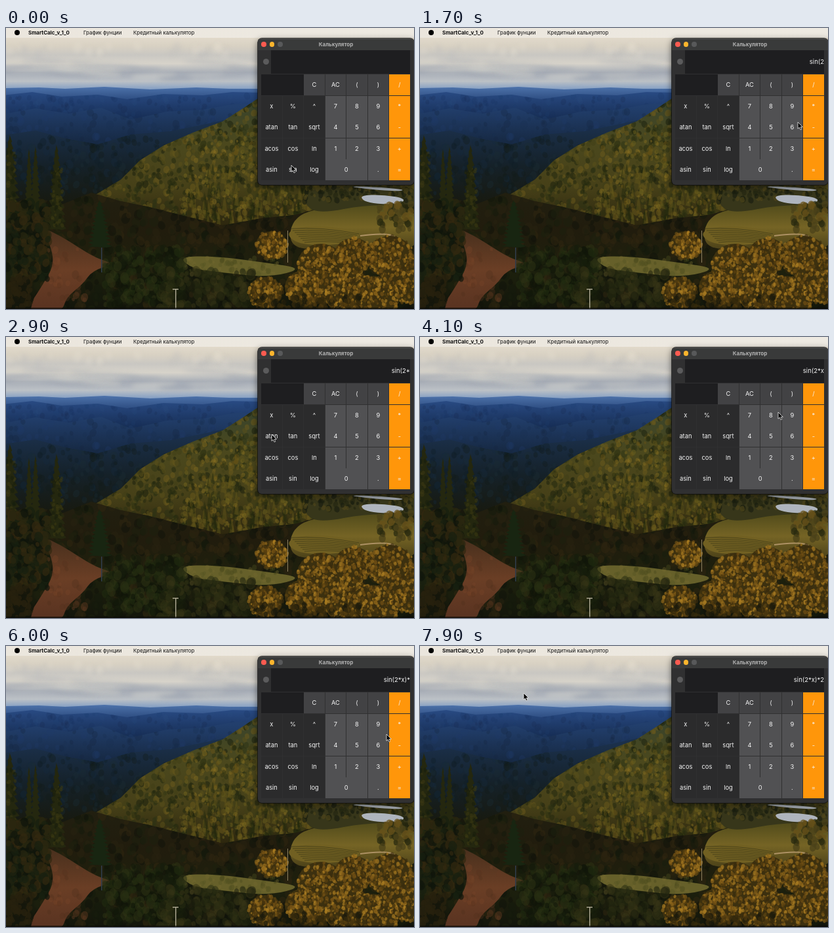
An HTML page with a canvas that plays this animation: 622x430 px, repeating every 8 s.

```html
<!DOCTYPE html>
<html lang="ru">
<head>
<meta charset="utf-8">
<title>Калькулятор</title>
<style>
html, body { margin: 0; width: 622px; height: 430px; overflow: hidden; background: #17170f; }
body { position: relative; font-family: Inter, "Noto Sans", sans-serif; cursor: default; }
body > * { position: absolute; }
#land { left: 0; top: 0; }
#menu { left: 0; top: 0; width: 622px; height: 15px; background: linear-gradient(90deg, #ebe6dd, #eeeae2); color: #111; font-size: 7.9px; line-height: 15px; }
#menu > * { position: absolute; top: 0; white-space: pre; }
#menu i { left: 13px; top: 3px; width: 8px; height: 8px; border-radius: 50%; background: #000; }
#win { left: 384px; top: 16px; width: 238px; height: 224px; background: #303031; border-radius: 6px; box-shadow: 0 0 0 .7px #111, 0 3px 11px rgba(0,0,0,.6); color: #f4f4f4; overflow: visible; }
#win > * { position: absolute; box-sizing: border-box; }
#bar { left: 0; top: 0; width: 238px; height: 18px; border-radius: 6px 6px 0 0; background: #393a3a; border-top: 1px solid #565656; color: #b2b2b2; font: 700 8px/16px Inter, "Noto Sans", sans-serif; text-align: center; }
.dot { border-radius: 50%; }
#out { left: 20px; top: 18px; width: 212px; height: 36px; background: #1e1e20; font-size: 9.5px; line-height: 35px; text-align: right; white-space: pre; }
.key { font-size: 9.3px; text-align: center; line-height: 32px; height: 32px; }
#ptr { left: 0; top: 0; overflow: visible; }
</style>
</head>
<body>
<canvas id="land" width="622" height="430"></canvas>
<div id="menu">
  <i></i>
  <b style="left:34px">SmartCalc_v_1_0</b>
  <span style="left:118px">График фунции</span>
  <span style="left:194px">Кредитный калькулятор</span>
</div>
<div id="win">
  <div id="bar">Калькулятор</div>
  <div id="out"></div>
</div>
<svg id="ptr" width="10" height="14"><path d="M0 0V10.2L2.3 8.1L4 11.7L5.8 10.9L4.2 7.4H7.4Z" fill="#050505" stroke="#eee" stroke-width=".8" stroke-linejoin="round"/></svg>
<script>
const g = document.getElementById('land').getContext('2d');
let seed = 41;
const rnd = () => (seed = (seed * 16807) % 2147483647) / 2147483647;
const between = (a, b) => a + (b - a) * rnd();

function shade(y0, y1, ...colors) {
  const f = g.createLinearGradient(0, y0, 0, y1);
  colors.forEach((c, i) => f.addColorStop(i / (colors.length - 1), c));
  return f;
}

// Smooth closed outline through "x,y x,y ..."
function shape(text, fill) {
  const p = text.split(' ').map(s => s.split(',').map(Number));
  const mid = (a, b) => [(a[0] + b[0]) / 2, (a[1] + b[1]) / 2];
  const path = new Path2D();
  path.moveTo(...mid(p[p.length - 1], p[0]));
  p.forEach((a, i) => path.quadraticCurveTo(...a, ...mid(a, p[(i + 1) % p.length])));
  path.closePath();
  g.fillStyle = fill;
  g.fill(path);
  return path;
}

// A slope whose crest follows the given points
function ridge(text, fill) {
  const path = new Path2D('M-5,440 L' + text.split(' ').join(' L') + ' L630,440Z');
  g.fillStyle = fill;
  g.fill(path);
  return path;
}

// Soft dabs of foliage kept inside a path
function leaves(path, [x, y, w, h], n, size, colors, alpha = .55) {
  g.save();
  if (path) g.clip(path);
  g.globalAlpha = alpha;
  for (let i = 0; i < n; i++) {
    const r = between(.4, 1) * size;
    g.fillStyle = colors[rnd() * colors.length | 0];
    g.beginPath();
    g.ellipse(x + rnd() * w, y + rnd() * h, r * .8, r, between(-.5, .5), 0, 7);
    g.fill();
  }
  g.restore();
}

function pine(x, top, base, half, color) {
  g.fillStyle = color;
  g.beginPath();
  g.moveTo(x, top);
  for (let s = 1; s > -2; s -= 2) {
    for (let i = 0; i <= 12; i++) {
      const k = s > 0 ? i / 12 : 1 - i / 12;
      const y = top + (base - top) * k, w = half * Math.pow(k, .7);
      g.lineTo(x + s * w, y);
      g.lineTo(x + s * w * .55, y + s * 2);
    }
  }
  g.fill();
}

function drawLand() {
  g.fillStyle = shade(14, 95, '#e2dacb', '#d8d1c3', '#c9c7c2', '#d7d3ca', '#a7adb6', '#bcc1c6', '#7e9bc3');
  g.fillRect(0, 0, 622, 100);
  g.filter = 'blur(3px)';
  leaves(null, [0, 28, 400, 12], 26, 9, ['#b9babb', '#e8e1d4'], .28);
  for (let i = 0; i < 24; i++) {
    g.globalAlpha = .35;
    g.fillStyle = i % 3 ? '#969fac' : '#e3ded3';
    g.beginPath();
    g.ellipse(rnd() * 400, between(48, 78), between(25, 60), between(1.5, 4), between(-.06, .06), 0, 7);
    g.fill();
  }
  g.globalAlpha = 1;
  g.filter = 'none';

  const blues = ['#1d3c70', '#17305b', '#2a4a7c', '#142747'];
  ridge('-5,92 50,91 90,93 150,90 220,94 290,91 340,93 630,93', shade(90, 150, '#4d72aa', '#1d3a6c', '#172c50'));
  let p = ridge('-5,103 40,98 85,105 140,102 185,109 240,101 300,103 345,98 630,104', shade(97, 180, '#294b84', '#172e55', '#101f36'));
  leaves(p, [0, 103, 400, 55], 200, 6, blues, .2);
  p = ridge('-5,132 45,123 95,131 145,122 190,140 245,128 300,125 350,116 630,112', shade(120, 225, '#223f6d', '#172a45', '#111b22'));
  leaves(p, [0, 128, 390, 60], 180, 7, ['#1f3b68', '#14253f', '#1a3152'], .3);
  p = ridge('-5,164 45,157 95,170 140,178 190,163 250,158 310,146 390,128 630,120', shade(150, 270, '#1b304b', '#152129', '#17190f'));
  leaves(p, [0, 165, 260, 90], 260, 7, ['#15283c', '#111d26', '#1a2b36', '#131b17'], .35);

  // Sunlit slope
  p = ridge('-5,290 125,262 175,232 205,202 240,180 285,160 330,143 363,122 385,107 630,100', shade(110, 310, '#38432c', '#4b481d', '#464018', '#29230d'));
  leaves(p, [145, 108, 480, 190], 1500, 6, ['#23290f', '#2c3215', '#5a501b', '#6c5b1d', '#413f17', '#191e0d'], .5);
  leaves(p, [270, 155, 180, 140], 330, 4.5, ['#806b20', '#6d601e', '#2a2e10', '#665217'], .5);
  for (let i = 0; i < 120; i++) {
    const x = between(275, 480), y = between(205, 290), h = between(9, 23);
    g.globalAlpha = .5;
    pine(x, y, y + h, h * .22, i % 3 ? '#5f541a' : '#242a0e');
  }
  g.globalAlpha = 1;

  // Dark forest floor
  p = ridge('-5,274 40,258 85,270 130,252 175,265 215,273 270,287 330,302 390,291 440,286 500,270 630,258', shade(250, 430, '#211f10', '#211c0d', '#1d200d', '#13150b'));
  leaves(p, [0, 255, 622, 180], 950, 9, ['#141a0d', '#292210', '#1c210e', '#302611', '#10130a'], .5);

  // Meadow, ponds and track
  shape('438,286 500,272 565,268 630,278 630,340 560,344 480,340 430,335', shade(270, 340, '#514b1b', '#756425', '#4a4018'));
  shape('425,315 450,303 500,304 545,314 522,331 450,333', '#716022');
  g.strokeStyle = '#413c17';
  g.lineWidth = .8;
  for (let i = 0; i < 8; i++) {
    g.beginPath();
    g.moveTo(434 + i * 3, 307 + i * 3);
    g.quadraticCurveTo(480, 304 + i * 3, 538 - i * 2, 315 + i * 2);
    g.stroke();
  }
  shape('455,243 630,240 630,273 550,270 480,284 455,272', '#37361a');
  leaves(null, [455, 241, 167, 25], 110, 5, ['#232711', '#4f451a', '#191d0f'], .65);
  shape('540,256 575,255 610,261 600,270 565,269 545,265', '#aeb4bd');
  shape('520,242 560,243 608,247 600,250 555,247', '#aab0b8');
  g.strokeStyle = '#ad9164';
  g.lineWidth = 2;
  g.beginPath();
  g.moveTo(540, 318);
  g.bezierCurveTo(600, 309, 610, 326, 566, 332);
  g.stroke();
  leaves(null, [565, 270, 60, 40], 60, 7, ['#4b4219', '#28290f', '#655019'], .75);
  shape('262,350 320,349 395,359 455,368 400,382 330,374 285,369', '#66602a');
  leaves(null, [270, 352, 150, 25], 70, 5, ['#545322', '#756a31', '#454519'], .35);

  // Dirt road
  shape('55,305 83,318 108,334 137,352 166,361 132,371 117,392 92,412 85,436 28,436 58,390 74,360 66,328', shade(310, 430, '#49301d', '#6a3e25', '#593321'));
  leaves(null, [62, 338, 60, 80], 40, 7, ['#774629', '#51301e', '#643a23'], .35);
  leaves(null, [150, 335, 120, 90], 240, 9, ['#202c10', '#161e0c', '#2b3214', '#111609'], .55);
  leaves(null, [235, 372, 150, 58], 180, 9, ['#282b11', '#181b0c', '#353315'], .5);

  // Trees on the left
  for (const [x, top, base, w] of [[6, 163, 292, 18], [35, 184, 288, 8], [45, 181, 283, 9], [77, 178, 307, 15], [143, 263, 334, 19]])
    pine(x, top, base, w, x === 143 ? '#182511' : '#24270f');
  leaves(null, [0, 185, 14, 90], 45, 4, ['#3d3914', '#171f0e'], .55);
  leaves(null, [69, 215, 17, 88], 50, 3.5, ['#3a3813', '#171d0c'], .55);
  leaves(null, [0, 267, 64, 117], 260, 9, ['#172010', '#28260f', '#32280f', '#10160b'], .7);
  leaves(null, [0, 382, 38, 48], 60, 8, ['#15160b', '#27200e'], .8);

  // Golden crowns, lower right
  const gold = ['#765316', '#59400f', '#936a1c', '#3a2d0e', '#ad8023'];
  for (const [x, y, r] of [[405, 332, 24], [480, 362, 36], [455, 397, 30], [395, 404, 26], [515, 397, 38], [530, 348, 30], [585, 350, 36], [612, 387, 38], [560, 413, 38]]) {
    g.fillStyle = '#3c300f';
    g.beginPath();
    g.ellipse(x, y, r, r * .88, 0, 0, 7);
    g.fill();
    for (let i = 0; i < r * 7; i++) {
      const a = rnd() * 6.28, d = Math.sqrt(rnd()) * r;
      leaves(null, [x + Math.cos(a) * d, y + Math.sin(a) * d * .9, 1, 1], 1, 3.8, gold, .65);
    }
  }
  leaves(null, [380, 410, 160, 22], 100, 6, ['#1b190b', '#34290d', '#4e390f'], .7);

  g.fillStyle = '#8d8060';
  g.fillRect(429, 310, 1, 49);
  g.fillStyle = '#aaa58f';
  g.fillRect(258, 400, 1.5, 30);
  g.fillRect(254, 399, 9, 1.5);
  g.fillStyle = '#303d4c';
  g.fillRect(145, 336, 1.5, 38);
  g.fillStyle = 'rgba(8,8,5,.7)';
  g.fillRect(0, 428, 622, 2);
}

const win = document.getElementById('win');
const out = document.getElementById('out');
const ptr = document.getElementById('ptr');

function add(cls, x, y, w, h, fill, text = '') {
  const e = document.createElement('div');
  e.className = cls;
  e.textContent = text;
  e.style.cssText = `left:${x}px;top:${y}px;width:${w}px;height:${h}px;background:${fill}`;
  return win.appendChild(e);
}

['#fd5b50', '#fcb52d', '#58595a'].forEach((c, i) => add('dot', 5 + i * 12.7, 5, 7.5, 7.5, c));
add('dot', 7.5, 31, 9, 9, '#5b5b5c');
add('', 5, 55, 64.5, 32, '#1e1e20');

const rows = ['  C AC ( ) /', 'x % ^ 7 8 9 *', 'atan tan sqrt 4 5 6 -', 'acos cos ln 1 2 3 +', 'asin sin log 0  . ='];
const keys = {};
rows.forEach((row, r) => row.split(' ').forEach((label, c) => {
  if (!label) return;
  const wide = label === '0';
  const fill = c === 6 ? '#ff960a' : r === 0 ? '#424244' : c < 3 ? '#2b2b2c' : '#515153';
  keys[label] = add('key', 5 + c * 32.5, 55 + r * 32.5, wide ? 64.3 : 31.8, 32, fill, label);
}));

const typed = [[0, 0], [300, 4], [1200, 5], [2100, 6], [3600, 7], [5100, 8], [5600, 9], [6700, 10]];
const route = [
  [0, 435, 210], [400, 435, 210], [1000, 534, 184], [1400, 534, 184],
  [1700, 576, 144], [1900, 598, 118], [2300, 598, 118], [2700, 450, 146],
  [2900, 405, 149], [3200, 404, 120], [3700, 404, 120], [4100, 546, 115],
  [4300, 549, 112], [4700, 564, 91], [5200, 564, 91], [5500, 598, 118],
  [5800, 598, 118], [6000, 580, 135], [6400, 535, 184], [7000, 537, 188],
  [7200, 500, 184], [7600, 270, 115], [7900, 158, 72], [8000, 158, 72]
];

function show(now) {
  const t = Math.floor(now % 8000 / 100) * 100;
  const i = route.findIndex(s => s[0] > t);
  const [t0, x0, y0] = route[i - 1], [t1, x1, y1] = route[i];
  const k = (t - t0) / (t1 - t0);
  ptr.style.transform = `translate(${x0 + (x1 - x0) * k}px,${y0 + (y1 - y0) * k}px)`;
  const n = typed.filter(s => s[0] <= t).pop()[1];
  out.textContent = 'sin(2*x)*2'.slice(0, n);
  keys[')'].style.background = t >= 4900 && t < 5100 ? '#353537' : '#424244';
}

drawLand();
const start = performance.now();
function tick() {
  show(performance.now() - start);
  requestAnimationFrame(tick);
}
tick();
</script>
</body>
</html>
```
